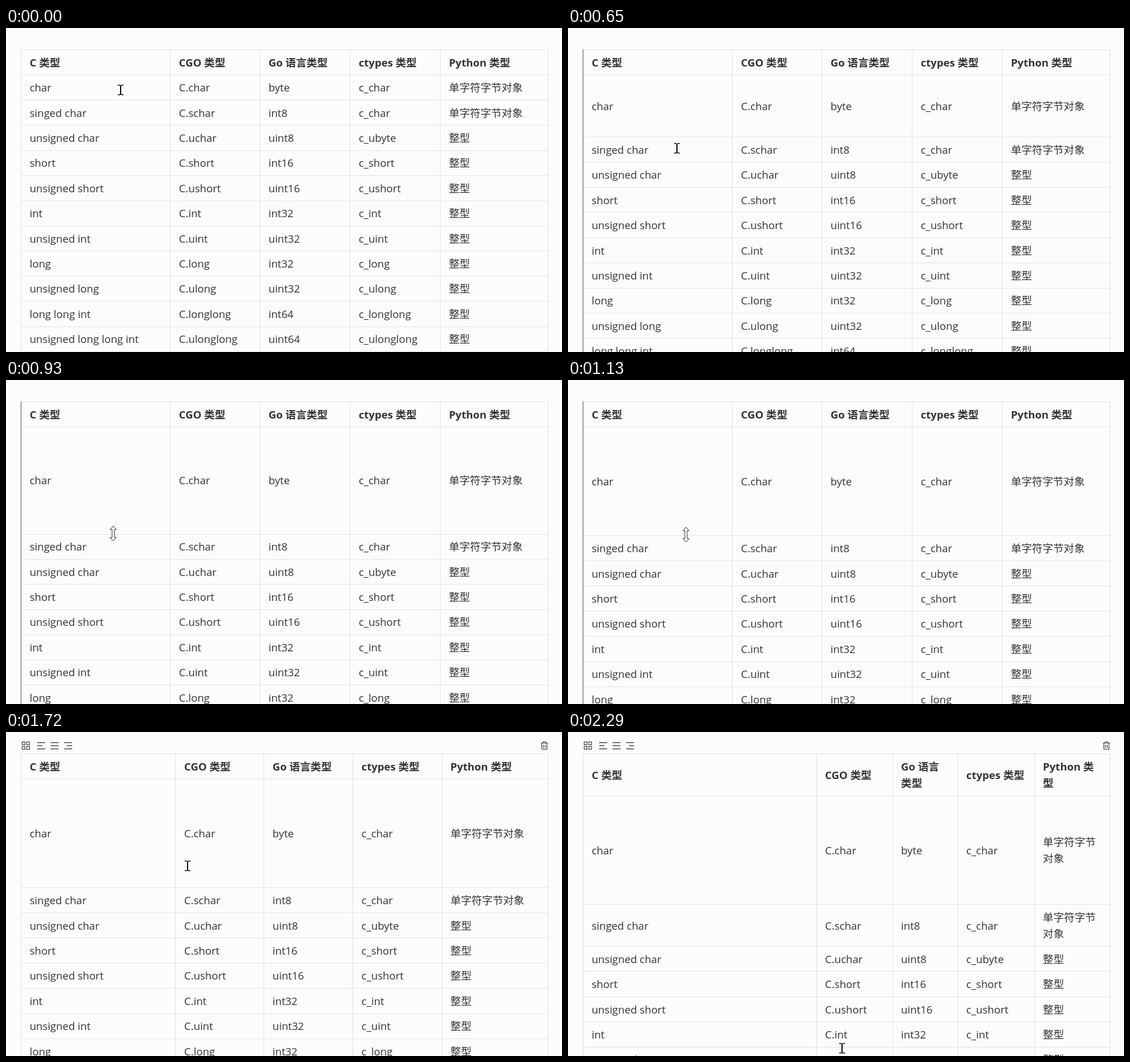
These frames come from a looping animation (980 by 572 pixels, 2330 ms). An HTML page with a canvas:

```html
<!DOCTYPE html>
<html lang="zh-CN">
<head>
<meta charset="utf-8">
<title>Table resize</title>
<style>
html, body { margin: 0; width: 100%; height: 100%; overflow: hidden; background: #fcfcfc; }
canvas { display: block; }
</style>
</head>
<body>
<canvas id="stage" width="980" height="572"></canvas>
<script>
const ctx = document.getElementById('stage').getContext('2d');
const WIDTH = 980, HEIGHT = 572, LOOP = 2330, BEAT = 50;
const FONT = '18.6px "Open Sans", "Noto Sans CJK SC", "Noto Sans CJK", sans-serif';
const INK = '#333335', BORDER = '#e1e2e4', PAPER = '#fcfcfc', ICON = '#3c3c3e';
const LEFT = 26.6, RIGHT = 955.5, TOP = 38, ROW = 44.42, LINE = 29.6, PAD = 15.1;

// "|" marks where a cell breaks once its column gets narrow.
const BYTES = '单字符字节|对象', INTEGER = '整型';
const table = [
  ['C 类型', 'CGO 类型', 'Go 语言|类型', 'ctypes 类型', 'Python 类|型'],
  ['char', 'C.char', 'byte', 'c_char', BYTES],
  ['singed char', 'C.schar', 'int8', 'c_char', BYTES],
  ['unsigned char', 'C.uchar', 'uint8', 'c_ubyte', INTEGER],
  ['short', 'C.short', 'int16', 'c_short', INTEGER],
  ['unsigned short', 'C.ushort', 'uint16', 'c_ushort', INTEGER],
  ['int', 'C.int', 'int32', 'c_int', INTEGER],
  ['unsigned int', 'C.uint', 'uint32', 'c_uint', INTEGER],
  ['long', 'C.long', 'int32', 'c_long', INTEGER],
  ['unsigned long', 'C.ulong', 'uint32', 'c_ulong', INTEGER],
  ['long long int', 'C.longlong', 'int64', 'c_longlong', INTEGER],
  ['unsigned long long int', 'C.ulonglong', 'uint64', 'c_ulonglong', INTEGER]
];

const linear = u => u;
const easeIn = power => u => u ** power;
const easeOut = power => u => 1 - (1 - u) ** power;
const mix = (a, b, u) => a + (b - a) * u;
const progress = (t, start, end) => Math.min(1, Math.max(0, (t - start) / (end - start)));

const rowDrag = { start: 550, end: 1030, from: [195, 124], to: [189, 271], ease: easeOut(4) };
const columnDrag = { start: 1670, end: 1870, from: [291, 235], to: [440, 245], ease: easeIn(1.2) };
const pointerMoves = [
  { start: 0, end: 260, from: [201, 110], to: [195, 124], ease: linear },
  rowDrag,
  { start: 1080, end: 1460, from: [195, 279], to: [291, 235], ease: linear },
  columnDrag,
  { start: 2100, end: 2290, from: [440, 245], to: [482, 559], ease: linear }
];
const TOOLBAR_AT = 1230;

// The screen refreshes once per beat while something moves, and rests between.
const activeSpans = [[0, 260], [550, 840], [930, 1030], [1080, 1460], [1670, 1870], [2100, 2290]];
function refreshTime(time) {
  const [start, end] = activeSpans.filter(span => span[0] <= time).pop();
  return time >= end ? end : start + Math.floor((time - start) / BEAT) * BEAT;
}

function pointerAt(t) {
  const { start, end, from, to, ease } = pointerMoves.filter(move => move.start <= t).pop();
  const u = ease(progress(t, start, end));
  return from.map((value, axis) => Math.round(mix(value, to[axis], u)));
}

const rowGrowth = t => 147.6 * easeOut(2.5)(progress(t, rowDrag.start, rowDrag.end));

function columnEdges(t, narrow) {
  if (narrow) return [LEFT, 438, 572, 687, 822, RIGHT];
  const first = mix(289.7, 438, easeIn(2)(progress(t, columnDrag.start, columnDrag.end)));
  return [LEFT, ...[0, 0.2372, 0.476, 0.7147, 1].map(share => mix(first, RIGHT, share))];
}

function drawCell(cell, x, middle, narrow) {
  const lines = narrow ? cell.split('|') : [cell.replace('|', '')];
  lines.forEach((line, i) => {
    const y = middle + (i - (lines.length - 1) / 2) * LINE;
    ctx.fillText(line, x + PAD, Math.round(y) + 7);
  });
}

function drawTable(edges, growth, narrow, activeEdge) {
  let top = TOP;
  const rule = y => ctx.fillRect(Math.floor(LEFT), Math.round(y), RIGHT - LEFT + 1, 1);
  table.forEach((cells, r) => {
    const wraps = narrow && r !== 1 && cells.some(cell => cell.includes('|'));
    const height = ROW + (r === 1 ? growth : 0) + (wraps ? LINE : 0);
    ctx.font = (r ? '' : 'bold ') + FONT;
    ctx.fillStyle = INK;
    cells.forEach((cell, c) => drawCell(cell, edges[c], top + height / 2 + 0.5, narrow));
    ctx.fillStyle = BORDER;
    rule(top);
    top += height;
  });
  rule(top);
  edges.forEach((x, i) => {
    ctx.fillStyle = activeEdge && i === 0 ? '#505052' : BORDER;
    ctx.fillRect(Math.floor(x), TOP, 1, HEIGHT - TOP);
  });
}

function drawAlignIcon(x, midWidth, indent) {
  ctx.fillRect(x, 18, 14, 1.4);
  ctx.fillRect(x + indent, 23.5, midWidth, 1.4);
  ctx.fillRect(x, 29, 14, 1.4);
}

function drawToolbar() {
  ctx.strokeStyle = ctx.fillStyle = ICON;
  ctx.lineWidth = 1.2;
  for (const x of [28.5, 36.5]) for (const y of [17.5, 25.5]) ctx.strokeRect(x, y, 5, 5);
  drawAlignIcon(55, 9, 0);
  drawAlignIcon(78.5, 14, 0);
  drawAlignIcon(102.5, 9, 5);
  ctx.stroke(new Path2D('M943 19.5h12M946.5 19v-1.5h5v1.5M944.5 20v10.5h9v-10.5M947.5 22.5v5.5M950.5 22.5v5.5'));
}

function drawBeam(x, y) {
  ctx.fillStyle = '#000';
  ctx.fillRect(x, y - 9, 2, 17);
  for (const edge of [y - 10, y + 7]) {
    ctx.fillRect(x - 4, edge, 4, 1.5);
    ctx.fillRect(x + 2, edge, 4, 1.5);
  }
}

function drawResize(x, y) {
  const arrow = new Path2D('M0-13l5.5 6h-3.5v14h3.5l-5.5 6l-5.5-6h3.5v-14h-3.5z');
  ctx.save();
  ctx.translate(x, y);
  ctx.fillStyle = '#fff';
  ctx.fill(arrow);
  ctx.strokeStyle = '#222';
  ctx.lineWidth = 1;
  ctx.stroke(arrow);
  ctx.restore();
}

function draw(now) {
  const t = refreshTime(now % LOOP);
  const growth = rowGrowth(t);
  const narrow = t >= columnDrag.end;
  const toolbar = t >= TOOLBAR_AT;
  ctx.fillStyle = PAPER;
  ctx.fillRect(0, 0, WIDTH, HEIGHT);
  drawTable(columnEdges(t, narrow), growth, narrow, t >= rowDrag.start && !toolbar);
  if (toolbar) drawToolbar();

  const [x, y] = pointerAt(t);
  const onRowEdge = !toolbar && Math.abs(y - (TOP + 2 * ROW + growth)) < 6.5;
  (onRowEdge ? drawResize : drawBeam)(x, y);
}

const start = performance.now();
function loop() {
  draw(performance.now() - start);
  requestAnimationFrame(loop);
}
loop();
</script>
</body>
</html>
```
